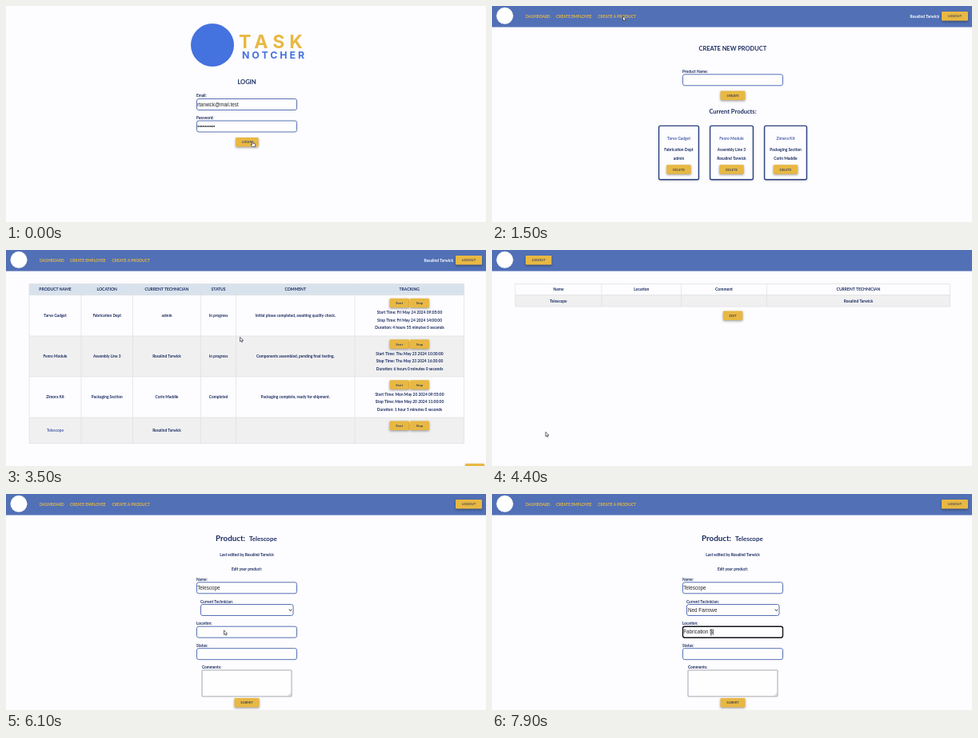
Animation, 600 px wide and 271 px high, one loop 8 s. Source, as an HTML page with a canvas:

```html
<!DOCTYPE html>
<html lang="en">
<head>
<meta charset="utf-8">
<title>Work tracking demo</title>
<style>
html, body { margin: 0; width: 100%; height: 100%; overflow: hidden; background: #fdfcfe; }
canvas { display: block; width: 600px; height: 271px; }
</style>
</head>
<body>
<canvas id="stage"></canvas>
<script>
const W = 600, H = 271, LOOP = 8000, STEP = 100;
const canvas = document.getElementById('stage');
const ctx = canvas.getContext('2d');
const ratio = window.devicePixelRatio || 1;
canvas.width = W * ratio;
canvas.height = H * ratio;

const NAVY = '#1b2d62', BLUE = '#5671b4', LINK = '#4a62a8', GOLD = '#e8b843';
const PAGE = '#fdfcfe', LINE = '#dedee2', STRIPE = '#f0f0f0';
const SANS = 'Lato, sans-serif', FIELD = '"Liberation Sans", Arial, sans-serif';
const USER = 'Rosalind Tarwick';

const products = [
  { name: 'Tarvo Gadget', place: 'Fabrication Dept', who: 'admin', status: 'In progress',
    note: 'Initial phase completed, awaiting quality check.',
    start: 'Fri May 24 2024 09:05:00', stop: 'Fri May 24 2024 14:00:00', span: '4 hours 55 minutes 0 seconds' },
  { name: 'Fenro Module', place: 'Assembly Line 3', who: USER, status: 'In progress',
    note: 'Components assembled, pending final testing.',
    start: 'Thu May 23 2024 10:30:00', stop: 'Thu May 23 2024 16:30:00', span: '6 hours 0 minutes 0 seconds' },
  { name: 'Zimora Kit', place: 'Packaging Section', who: 'Corin Maddle', status: 'Completed',
    note: 'Packaging complete, ready for shipment.',
    start: 'Mon May 20 2024 09:55:00', stop: 'Mon May 20 2024 11:00:00', span: '1 hour 5 minutes 0 seconds' }
];
const added = { name: 'Telescope', place: '', who: USER, status: '', note: '' };

// Text is placed by the middle of its capitals.
function text(str, x, y, { size = 4.9, color = NAVY, align = 'center', weight = 700, font = SANS, gap = 0 } = {}) {
  ctx.font = `${weight} ${size}px ${font}`;
  ctx.letterSpacing = gap + 'px';
  ctx.textAlign = align;
  ctx.fillStyle = color;
  ctx.fillText(str, x, y + size * 0.355);
  return ctx.measureText(str).width;
}

function rect(x, y, w, h, color) {
  ctx.fillStyle = color;
  ctx.fillRect(x, y, w, h);
}

function box(x, y, w, h, r, fill, stroke, width = 1) {
  ctx.beginPath();
  ctx.roundRect(x, y, w, h, r);
  if (fill) { ctx.fillStyle = fill; ctx.fill(); }
  if (stroke) { ctx.strokeStyle = stroke; ctx.lineWidth = width; ctx.stroke(); }
}

function shaded(paint, blur, dy, alpha) {
  ctx.save();
  ctx.shadowColor = `rgba(0,0,0,${alpha})`;
  ctx.shadowBlur = blur * ratio;
  ctx.shadowOffsetY = dy * ratio;
  paint();
  ctx.restore();
}

function dot(x, y, r, color) {
  ctx.fillStyle = color;
  ctx.beginPath();
  ctx.arc(x, y, r, 0, Math.PI * 2);
  ctx.fill();
}

function button(label, x, y, w, h = 11.5) {
  shaded(() => box(x, y, w, h, 1.2, GOLD), 3, 1.2, 0.38);
  text(label, x + w / 2, y + h / 2, { size: 4.15, weight: 600, color: '#2c3555' });
}

function field(x, y, w, { value = '', focus = false, caret = false, pad = 1.2 } = {}) {
  box(x + 0.5, y + 0.5, w - 1, 14, 2.4, '#fefeff', focus ? '#11131a' : BLUE, focus ? 1.4 : 1);
  const width = text(value, x + pad, y + 7.4, { size: 6.3, color: '#25262b', align: 'left', weight: 400, font: FIELD });
  if (caret) rect(x + pad + width + 0.1, y + 3.9, 0.6, 7.2, '#111');
}

const label = (str, x, y) => text(str, x, y, { size: 4.75, align: 'left' });

function bar() {
  rect(0, 0, W, 26.5, '#5170b6');
  dot(16, 12.3, 10.5, '#fff');
}

function nav(user) {
  bar();
  const style = { size: 4.9, color: GOLD, align: 'left' };
  text('DASHBOARD', 42, 12.8, style);
  text('CREATE EMPLOYEE', 80, 12.8, style);
  text('CREATE A PRODUCT', 132.5, 12.8, style);
  if (user) text(user, 559, 12.8, { size: 4.9, color: '#fff', align: 'right' });
  button('LOGOUT', 562, 7, 33);
}

function grid(cols, rows) {
  ctx.strokeStyle = LINE;
  ctx.lineWidth = 0.7;
  ctx.beginPath();
  const [left, right, top, bottom] = [cols[0], cols.at(-1), rows[0], rows.at(-1)];
  cols.forEach(x => { ctx.moveTo(x, top); ctx.lineTo(x, bottom); });
  rows.forEach(y => { ctx.moveTo(left, y); ctx.lineTo(right, y); });
  ctx.stroke();
}

const cells = (cols, items, y, style) =>
  items.forEach((s, i) => text(s, (cols[i] + cols[i + 1]) / 2, y, style));

function login() {
  dot(258, 49, 27, '#4472de');
  text('TASK', 291, 44.6, { size: 23, color: GOLD, align: 'left', font: 'Inter, sans-serif', gap: 6 });
  text('NOTCHER', 295, 61.6, { size: 12.3, color: '#4472de', align: 'left', font: 'Inter, sans-serif', gap: 3 });
  text('LOGIN', 301, 95.4, { size: 7.5 });
  label('Email:', 238, 112.6);
  field(238, 116, 126, { value: 'rtarwick@mail.test' });
  label('Password:', 238, 140.3);
  field(238, 143.5, 126, { value: '•'.repeat(10) });
  button('LOGIN', 287, 165, 28.5);
}

function dashboard(list) {
  nav(USER);
  const cols = [29, 94, 158.5, 243.5, 287.5, 436, 572.5];
  const rows = [42.5, 56.5, 108, 159, 210.3];
  if (list.length > 3) rows.push(242.5);
  rect(29, 42.5, 543.5, 14, '#d8e2ec');
  list.forEach((p, i) => {
    if (i % 2) rect(29, rows[i + 1], 543.5, rows[i + 2] - rows[i + 1], STRIPE);
  });
  grid(cols, rows);
  cells(cols, ['PRODUCT NAME', 'LOCATION', 'CURRENT TECHNICIAN', 'STATUS', 'COMMENT', 'TRACKING'], 49.6, { size: 5 });
  list.forEach((p, i) => {
    const top = rows[i + 1], mid = (top + rows[i + 2]) / 2;
    text(p.name, 61.5, mid, { size: 4.8, color: p === added ? LINK : NAVY });
    cells(cols.slice(1), [p.place, p.who, p.status, p.note], mid, { size: 4.8 });
    button('Start', 479.5, top + 4.3, 24.5);
    button('Stop', 505, top + 4.3, 24);
    if (p.start) {
      text('Start Time: ' + p.start, 504.5, top + 22);
      text('Stop Time: ' + p.stop, 504.5, top + 31.5);
      text('Duration: ' + p.span, 504.5, top + 41);
    }
  });
  button('', 574, 268, 24);
}

function create(t) {
  nav(USER);
  text('CREATE NEW PRODUCT', 300.8, 53.5, { size: 7.45 });
  label('Product Name:', 238, 82);
  const count = typed(t, [[2100, 1], [2300, 2], [2400, 3], [2500, 4], [2700, 5], [2800, 6], [2900, 8], [3000, 9]]);
  field(238, 85.3, 126, { value: 'Telescope'.slice(0, count), focus: t >= 1900, caret: t >= 2100 && t < 3300 });
  button('CREATE', 285.5, 106.5, 31);
  text('Current Products:', 301, 132.4, { size: 7.5 });
  [[208, 51], [272, 55], [340, 54]].forEach(([x, w], i) => {
    const p = products[i], mid = x + w / 2;
    shaded(() => box(x + 0.6, 150.4, w - 1.2, 67.4, 1.8, PAGE), 3, 1, 0.3);
    box(x + 0.6, 150.4, w - 1.2, 67.4, 1.8, null, '#2c4283', 1.4);
    text(p.name, mid, 166.7, { color: LINK });
    text(p.place, mid, 179.9);
    text(p.who, mid, 191.2);
    button('DELETE', mid - 15.3, 199.3, 30.5);
  });
}

function detail() {
  bar();
  button('LOGOUT', 42, 7, 32.5);
  const cols = [29, 137, 236.5, 343.5, 572.5];
  rect(29, 56.5, 543.5, 14.5, STRIPE);
  grid(cols, [42.5, 56.5, 71]);
  cells(cols, ['Name', 'Location', 'Comment', 'CURRENT TECHNICIAN'], 49.6, { size: 5 });
  cells(cols, ['Telescope', '', '', USER], 63.8);
  button('EDIT', 288.8, 76.5, 24.5);
}

function edit(t) {
  nav();
  text('Product:', 262, 55.4, { size: 9.8, align: 'left' });
  text('Telescope', 304, 56, { size: 7.9, align: 'left' });
  text('Last edited by ' + USER, 301, 76.5, { size: 4.85 });
  text('Edit your product:', 301, 94.7, { size: 4.75 });

  label('Name:', 238, 107.4);
  field(238, 110.3, 126, { value: 'Telescope' });

  label('Current Technician:', 243, 135);
  field(243, 138, 116.5, { value: t >= 6200 ? 'Ned Farrowe' : '', focus: t >= 6200 && t < 6500, pad: 2 });
  ctx.strokeStyle = '#222';
  ctx.lineWidth = 1;
  ctx.beginPath();
  ctx.moveTo(353.8, 144.8);
  ctx.lineTo(355.5, 146.5);
  ctx.lineTo(357.2, 144.8);
  ctx.stroke();

  label('Location:', 238, 162.5);
  const count = t < 7100 ? 0 : Math.round(13 * ((t - 7100) / STEP + 1) / 9);
  const caret = t >= 7100 || (t >= 6700 && t < 6900);
  field(238, 165.7, 126, { value: 'Fabrication S'.slice(0, count), focus: t >= 6500, caret });

  label('Status:', 238, 190.2);
  field(238, 193.2, 126);

  label('Comments:', 245, 217.5);
  box(245, 221, 112, 33, 0.5, '#fefeff', '#8f929c', 0.8);
  ctx.strokeStyle = '#888';
  ctx.lineWidth = 0.5;
  ctx.beginPath();
  [3.6, 1.8].forEach(d => { ctx.moveTo(356.4 - d, 253.4); ctx.lineTo(356.4, 253.4 - d); });
  ctx.stroke();
  button('SUBMIT', 285.5, 256, 31);
}

function typed(t, steps) {
  return steps.reduce((n, [at, len]) => t >= at ? len : n, 0);
}

// Pointer stops: time, tip x, tip y, shape from then on.
const stops = [
  [0, 308.3, 169.5, 'hand'], [600, 308.3, 169.5, 'arrow'], [1100, 163.5, 13, 'hand'],
  [1500, 163.5, 13, 'arrow'], [1900, 290, 93, 'beam'], [3200, 290, 93, 'arrow'],
  [3400, 292.5, 109.3, 'hand'], [3500, 292.5, 109.3, 'arrow'], [3800, 130, 190, 'arrow'],
  [3900, 130, 190, 'arrow'], [4200, 67, 228.3, 'hand'], [4400, 67, 228.3, 'arrow'],
  [4800, 262, 104, 'arrow'], [5000, 300, 81, 'hand'], [5200, 300, 81, 'arrow'],
  [5700, 292, 145, 'arrow'], [5800, 292, 145, 'arrow'], [6100, 272.5, 171, 'arrow'],
  [6500, 274, 173.5, 'beam'], [8000, 274, 173.5, 'beam']
];

function pointer(t) {
  const i = Math.max(0, stops.findIndex(s => s[0] > t) - 1);
  const [t0, x0, y0, shape] = stops[i], [t1, x1, y1] = stops[i + 1];
  const k = (t - t0) / (t1 - t0), e = k * k * (3 - 2 * k);
  ctx.save();
  ctx.translate(x0 + (x1 - x0) * e, y0 + (y1 - y0) * e);
  ctx.lineJoin = 'round';
  shapes[shape]();
  ctx.restore();
}

function outline(d) {
  const path = new Path2D(d);
  ctx.fillStyle = '#fff';
  ctx.fill(path);
  ctx.strokeStyle = '#3a3d48';
  ctx.lineWidth = 0.75;
  ctx.stroke(path);
}

const shapes = {
  arrow: () => outline('M0 0V5.6L1.3 4.4 2.2 6.4 3.2 5.9 2.3 4H4.1Z'),
  hand: () => outline('M-.6 .6Q0-.4 .6 .6V2.8L3 3.4Q3.6 3.6 3.5 4.4L3 7.2H-.5L-2.2 4.6Q-2.2 3.7-1.3 4L-.6 4.6Z'),
  beam() {
    ctx.strokeStyle = '#333';
    ctx.lineWidth = 0.7;
    ctx.stroke(new Path2D('M-1.3-3.4H1.3M0-3.4V3.4M-1.3 3.4H1.3'));
  }
};

function page(t) {
  if (t < 200) login();
  else if (t < 1500) dashboard(products);
  else if (t < 3500) create(t);
  else if (t < 4400) dashboard([...products, added]);
  else if (t < 5200) detail();
  else edit(t);
}

function draw(now) {
  const t = Math.floor((now % LOOP) / STEP) * STEP;
  ctx.setTransform(ratio, 0, 0, ratio, 0, 0);
  rect(0, 0, W, H, PAGE);
  page(t);
  pointer(t);
}

let begin;
function tick(now) {
  begin ??= now;
  draw(now - begin);
  requestAnimationFrame(tick);
}
draw(0);
requestAnimationFrame(tick);
</script>
</body>
</html>
```
